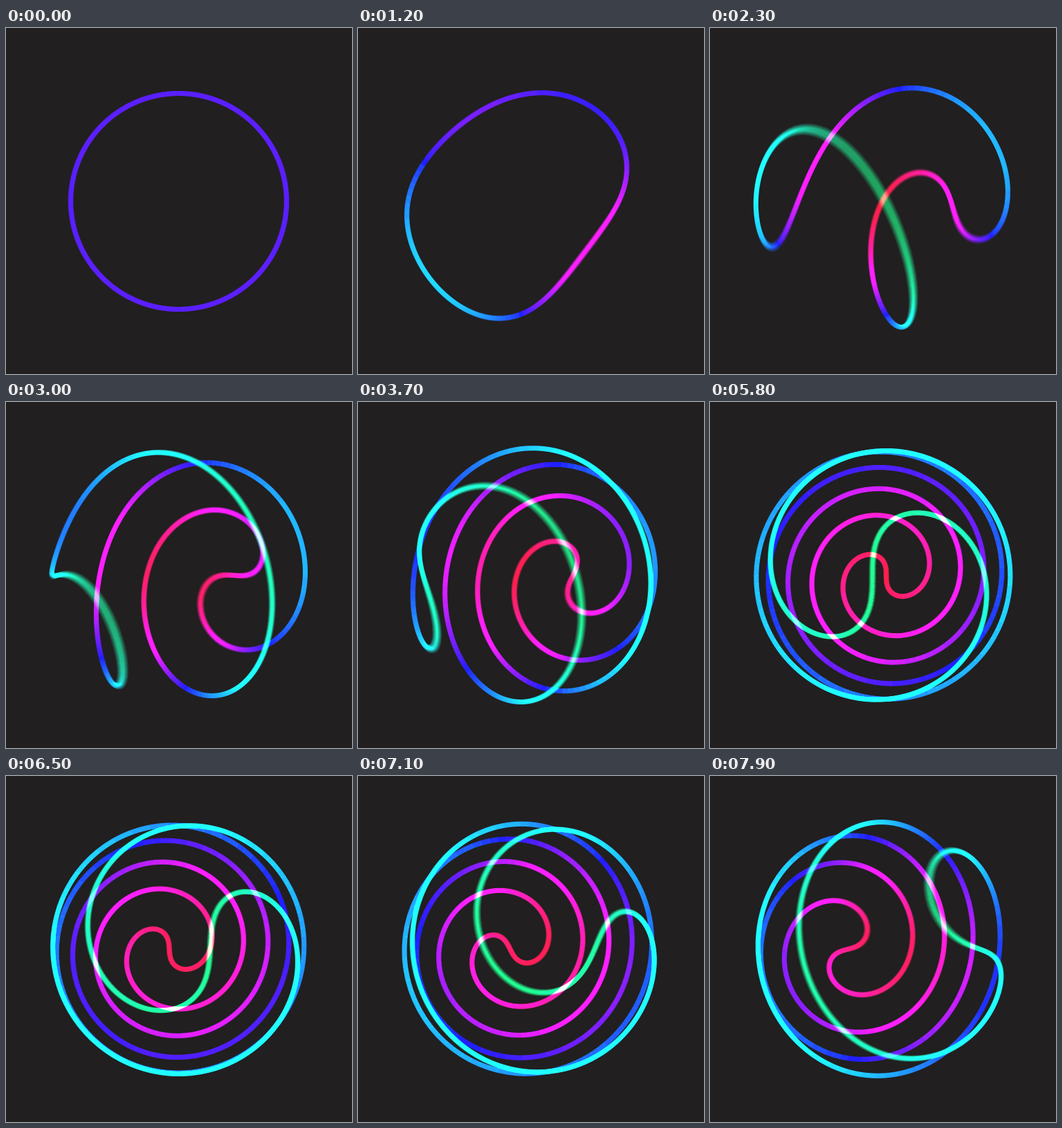
These frames come from a looping animation (500 by 500 pixels, 8 s). An HTML page with a canvas:

```html
<!DOCTYPE html>
<html lang="en">
<head>
<meta charset="utf-8">
<title>Twisting ring</title>
<style>
  html, body { margin: 0; width: 100%; height: 100%; overflow: hidden; background: #211f20; }
  canvas { display: block; }
</style>
</head>
<body>
<canvas id="stage" width="500" height="500"></canvas>
<script>
const ctx = document.getElementById('stage').getContext('2d');
const LOOP = 8000;          // visible part of the cycle, ms
const HALF = 6000;          // time to reach full twist and a quarter turn, ms
const MAX_TWIST = 3 * Math.PI;
const RADIUS = 156, DEPTH = 0.53;
const SEGMENTS = 720;
const SAMPLES = 15, SHUTTER = 50;   // motion blur

const smoother = x => x * x * x * (x * (6 * x - 15) + 10);

// A great circle twisted around its own axis, then turned about the vertical.
function ringPoint(u, twist, turn) {
  const w = Math.cos(u), s = Math.sin(u), psi = Math.PI / 2 - twist * w;
  const side = s * Math.cos(psi), up = s * Math.sin(psi);
  const x = w * Math.cos(turn) + side * Math.sin(turn);
  const z = side * Math.cos(turn) - w * Math.sin(turn);
  const scale = RADIUS / (1 - DEPTH * z);
  return { x: 250 + x * scale, y: 250.5 - up * scale, z };
}

function drawRing(time) {
  const phase = time / HALF;
  const twist = MAX_TWIST * smoother(1 - Math.abs(1 - phase));
  const turn = phase * Math.PI / 2;
  let a = ringPoint(0, twist, turn);
  for (let i = 1; i <= SEGMENTS; i++) {
    const b = ringPoint(i / SEGMENTS * 2 * Math.PI, twist, turn);
    ctx.strokeStyle = `hsl(${250 - 51 * (a.z + b.z)}, 100%, 50%)`;
    ctx.beginPath();
    ctx.moveTo(a.x, a.y);
    ctx.lineTo(b.x, b.y);
    ctx.stroke();
    a = b;
  }
}

function draw(time) {
  ctx.globalCompositeOperation = 'source-over';
  ctx.globalAlpha = 1;
  ctx.fillStyle = '#211f20';
  ctx.fillRect(0, 0, 500, 500);
  ctx.globalCompositeOperation = 'lighter';
  ctx.globalAlpha = 1 / SAMPLES;
  ctx.lineWidth = 7;
  for (let i = 0; i < SAMPLES; i++) drawRing(time + SHUTTER * i / SAMPLES);
}

function frame() {
  draw(performance.now() % LOOP);
  requestAnimationFrame(frame);
}
frame();
</script>
</body>
</html>
```
